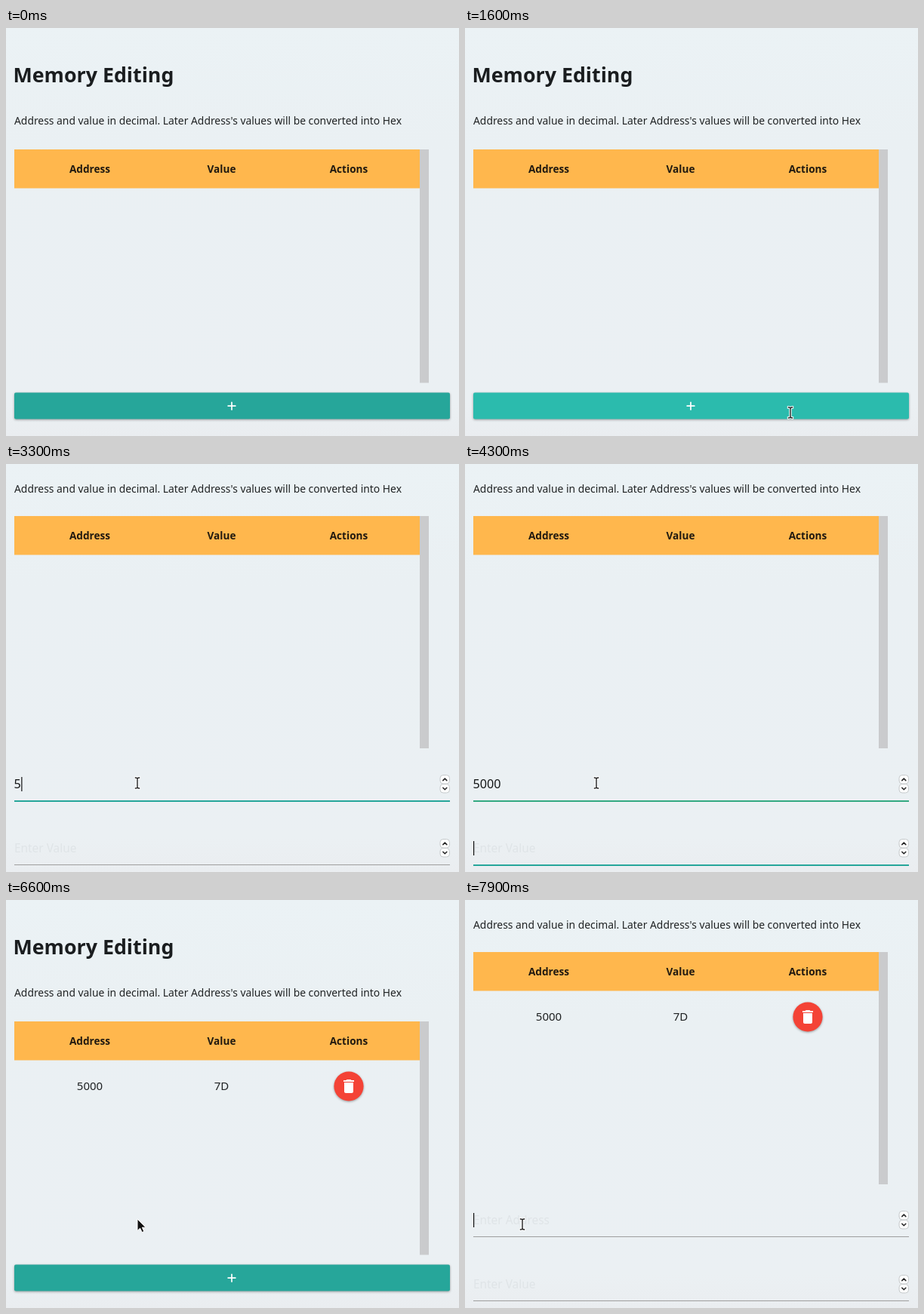
Recreate the animation shown at these times as an HTML page. Size 600x541 px, loop 8000 ms.

```html
<!DOCTYPE html>
<html lang="en">
<head>
<meta charset="utf-8">
<title>Memory Editing</title>
<style>
html, body { margin: 0; width: 100%; height: 100%; overflow: hidden; background: #ebf0f3; }
svg { display: block; width: 600px; height: 541px; font-family: "Noto Sans", sans-serif; fill: #202324; }
.title { font-size: 26.8px; font-weight: 700; fill: #1a1d1f; }
.lead { font-size: 13.87px; }
.head { font-size: 13.6px; font-weight: 700; text-anchor: middle; fill: #221a10; }
.cell { font-size: 15px; text-anchor: middle; }
.hint { font-size: 15.4px; fill: #dfe4e7; }
.entry { font-size: 16.2px; fill: #151718; }
.raised { filter: drop-shadow(0 1px 1.5px rgba(0,0,0,.36)); }
.spin rect { fill: #fcfdfd; stroke: #c6cacc; }
.spin path { fill: none; stroke: #222; stroke-width: 1.5; stroke-linecap: round; stroke-linejoin: round; }
</style>
</head>
<body>
<svg viewBox="0 0 600 541">
  <defs>
    <linearGradient id="sky" x2="0" y2="1">
      <stop offset="0" stop-color="#ebf2f5"/>
      <stop offset=".3" stop-color="#eaf0f3"/>
      <stop offset=".92" stop-color="#ebf0f3"/>
      <stop offset="1" stop-color="#eaedf0"/>
    </linearGradient>
    <g id="spin" class="spin">
      <rect x="575" y="412.5" width="12.5" height="11.5" rx="4"/>
      <rect x="575" y="424.5" width="12.5" height="11.5" rx="4"/>
      <path d="M578.8 419.6l2.5-2.5 2.5 2.5M578.8 429.2l2.5 2.5 2.5-2.5"/>
    </g>
  </defs>
  <rect width="600" height="541" fill="url(#sky)"/>
  <text id="title" class="title" x="9.5" y="72">Memory Editing</text>
  <text id="lead" class="lead" x="11">Address and value in decimal. Later Address's values will be converted into Hex</text>

  <g id="table">
    <rect x="11" y="161" width="537" height="51.5" fill="#ffb74d"/>
    <rect id="bar" x="548" y="161" width="12" fill="#cacbcd"/>
    <text class="head" x="111" y="192">Address</text>
    <text class="head" x="285.5" y="192">Value</text>
    <text class="head" x="454" y="192">Actions</text>
    <g id="row">
      <text class="cell" x="111" y="252">5000</text>
      <text class="cell" x="285.5" y="252">7D</text>
      <circle class="raised" cx="454" cy="247" r="19.6" fill="#f44336"/>
      <path transform="translate(442 235)" fill="#fff" d="M6 19c0 1.1.9 2 2 2h8c1.1 0 2-.9 2-2V7H6zM19 4h-3.5l-1-1h-5l-1 1H5v2h14z"/>
    </g>
  </g>

  <g id="add">
    <rect id="btn" class="raised" x="11" y="483.5" width="577" height="35" rx="2"/>
    <path d="M293.5 501.2h11M299 495.7v11" stroke="#fff" stroke-width="1.7"/>
  </g>

  <g id="form">
    <text id="hintA" class="hint" x="11" y="430">Enter Address</text>
    <text id="hintV" class="hint" x="11" y="515">Enter Value</text>
    <text id="textA" class="entry" x="10.5" y="430"></text>
    <text id="textV" class="entry" x="10.5" y="515" letter-spacing="-.9"></text>
    <rect id="lineA" x="11" y="446" width="577"/>
    <rect id="lineV" x="11" y="531" width="577"/>
    <use href="#spin"/>
    <use href="#spin" y="85"/>
    <rect id="caret" width="1.2" height="19" fill="#111"/>
  </g>

  <g id="pointer">
    <g id="beam" fill="none" stroke-linecap="square">
      <path d="M-2.5-7Q0-7 0-5.5Q0-7 2.5-7M0-5.5V5.5M-2.5 7Q0 7 0 5.5Q0 7 2.5 7" stroke="#fff" stroke-width="3.4"/>
      <path d="M-2.5-7Q0-7 0-5.5Q0-7 2.5-7M0-5.5V5.5M-2.5 7Q0 7 0 5.5Q0 7 2.5 7" stroke="#222" stroke-width="1.4"/>
    </g>
    <path id="arrow" d="M0 0V15.5L3.6 12.2L6.2 17.6L8.8 16.4L6.3 11.2H11Z" fill="#111" stroke="#fff"/>
    <path id="hand" d="M-1.6 1Q0-1 1.4 1V5L7 6.2Q9 6.8 8.8 9L7.8 14.5H-.6L-5.4 9.6Q-5.6 7.4-3.4 8L-1.6 9.4Z" fill="#111" stroke="#fff"/>
  </g>
</svg>
<script>
const LOOP = 8000, STEP = 100, SHIFT = 92, FADE = 300;
const OPEN = 2100, SUBMIT = 6200, REOPEN = 7400;
const TAB = 4200, ENTER = 5500;
const GREY = [158, 158, 158], TEAL = [38, 166, 154], GREEN = [76, 175, 80], HOVER = [43, 187, 173];
const $ = id => document.getElementById(id);
const set = (id, name, value) => $(id).setAttribute(name, value);
const show = (id, on) => set(id, "visibility", on ? "inherit" : "hidden");

const ramp = (t, start, span = FADE) => Math.min(1, Math.max(0, (t - start) / span));
const mix = (a, b, k) => a.map((v, i) => v + (b[i] - v) * k);
const rgb = c => `rgb(${c.map(Math.round)})`;

// time, x, y of the pointer's hot spot
const path = [
  [400, 452, 556], [900, 443, 514], [1200, 431, 510], [1800, 431, 510],
  [2000, 372, 498], [2300, 174, 423], [6600, 174, 423],
  [7100, 293, 490], [7300, 293, 490], [7800, 76, 430]
];

function pointerAt(t) {
  const i = path.findIndex(p => p[0] > t);
  if (i < 0) return path[path.length - 1].slice(1);
  if (i === 0) return path[0].slice(1);
  const a = path[i - 1], b = path[i];
  const k = ramp(t, a[0], b[0] - a[0]);
  return mix(a, b, k * (2 - k)).slice(1);
}

function pointerKind(t) {
  if (t < 1800) return "beam";
  if (t < OPEN) return "hand";
  if (t < 6000) return "beam";
  if (t < 6900) return "arrow";
  return t < REOPEN ? "hand" : "beam";
}

const typed = (text, times, t) => text.slice(0, times.filter(at => t >= at).length);

function drawLine(id, t, focus, done) {
  const k = ramp(t, focus);
  const color = t < done ? mix(GREY, TEAL, k) : mix(TEAL, GREEN, ramp(t, done));
  set(id, "fill", rgb(color));
  set(id, "height", 1 + k);
}

function drawForm(t) {
  const again = t >= REOPEN;
  const ft = again ? 2400 : t;
  const addr = typed("5000", [3200, 3600, 3700, 3900], ft);
  const val = typed("125", [4800, 5000, 5200], ft);
  $("textA").textContent = addr;
  $("textV").textContent = val;
  show("hintA", !addr);
  show("hintV", !val);
  drawLine("lineA", ft, 2400, TAB);
  drawLine("lineV", ft, TAB - 200 + (ft < TAB ? FADE : 0), ENTER);

  const onValue = ft >= TAB;
  const width = $(onValue ? "textV" : "textA").getComputedTextLength();
  set("caret", "x", 11 + width);
  set("caret", "y", onValue ? 500 : 415);
  show("caret", again ? t >= 7900 : t >= 2400 && t < ENTER);
}

function draw(t) {
  const editing = t >= OPEN && t < SUBMIT || t >= REOPEN;
  show("title", !editing);
  set("lead", "y", editing ? 38 : 128);
  set("table", "transform", `translate(0 ${editing ? -SHIFT : 0})`);
  set("bar", "height", editing ? 308 : 309.5);
  show("row", t >= SUBMIT);
  show("add", !editing);
  show("form", editing);
  if (editing) drawForm(t);

  const hover = t < SUBMIT ? ramp(t, 700) : ramp(t, 6850);
  set("btn", "fill", rgb(mix(TEAL, HOVER, hover)));

  const kind = pointerKind(t);
  for (const id of ["beam", "arrow", "hand"]) show(id, id === kind);
  show("pointer", t >= path[0][0]);
  set("pointer", "transform", `translate(${pointerAt(t)})`);
}

function tick(now) {
  draw(Math.floor(now % LOOP / STEP) * STEP);
  requestAnimationFrame(tick);
}
draw(0);
requestAnimationFrame(tick);
</script>
</body>
</html>
```
